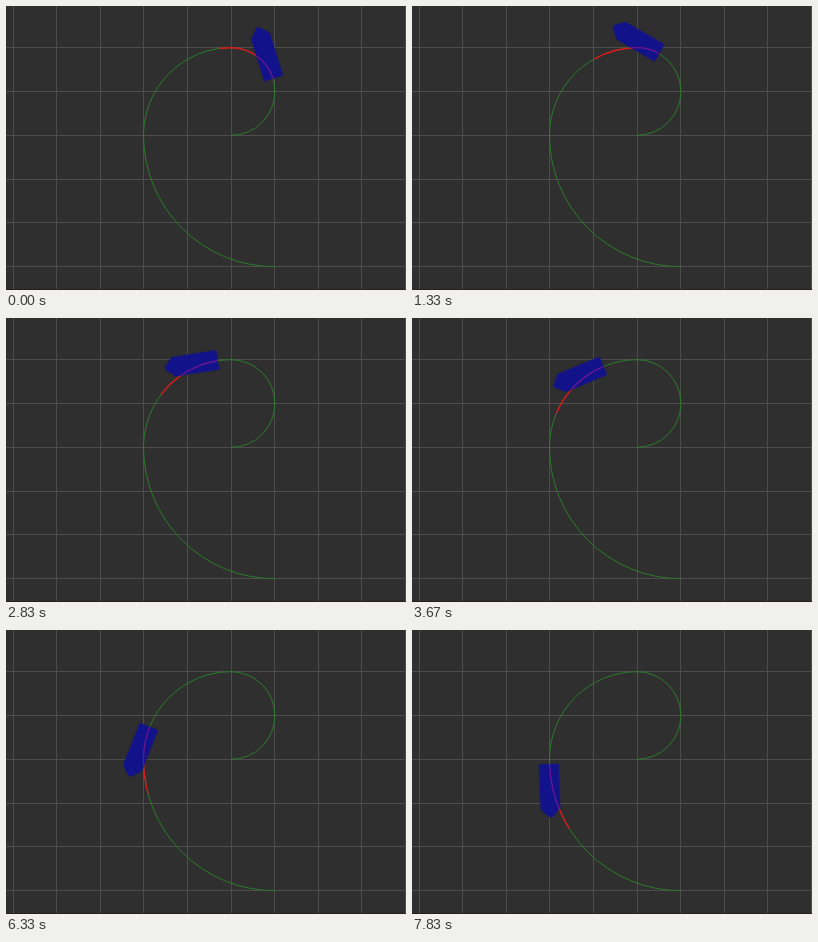
An HTML page with a canvas that plays this animation: 400 px wide and 284 px high, repeating every 8 s.

```html
<!DOCTYPE html>
<html lang="en">
<head>
<meta charset="utf-8">
<title>Path following</title>
<style>
  html, body { margin: 0; width: 100%; height: 100%; overflow: hidden; background: #2f2f2f; }
  canvas { display: block; }
</style>
</head>
<body>
<canvas id="stage" width="400" height="284"></canvas>
<script>
const ctx = document.getElementById('stage').getContext('2d');
const W = 400, H = 284, LOOP = 8000, STEPS_PER_MS = 0.006;
const CELL = 43.8, CX = 225.1, CY = 129.3;
const LOOKAHEAD = 67.5;

// Three arcs, each joined tangentially to the next.
const arcs = [
  { x: CX, y: CY - CELL, r: CELL, from: Math.PI / 2, sweep: Math.PI },
  { x: CX, y: CY, r: 2 * CELL, from: -Math.PI / 2, sweep: Math.PI / 2 },
  { x: CX + CELL, y: CY, r: 3 * CELL, from: Math.PI, sweep: Math.PI / 2 }
];
const track = new Path2D();
for (const a of arcs) track.arc(a.x, a.y, a.r, a.from, a.from - a.sweep, true);

const vehicle = new Path2D('M0 -9H44L53 -1V2L45 10.5H0Z');

// Time in ms and distance travelled along the track.
const travel = [[0, 82], [1333, 114.5], [2167, 134], [3667, 172.2],
                [5000, 207.8], [6333, 242], [7833, 280], [8000, 284]];

function distanceAt(t) {
  const i = Math.max(1, travel.findIndex(([time]) => time >= t));
  const [t0, s0] = travel[i - 1], [t1, s1] = travel[i];
  return s0 + (s1 - s0) * (t - t0) / (t1 - t0);
}

function poseAt(s) {
  let i = 0;
  while (i < arcs.length - 1 && s > arcs[i].r * arcs[i].sweep) {
    s -= arcs[i].r * arcs[i].sweep;
    i++;
  }
  const { x, y, r, from } = arcs[i];
  const angle = from - s / r;
  return { x: x + r * Math.cos(angle), y: y + r * Math.sin(angle), heading: angle - Math.PI / 2 };
}

function drawGrid() {
  ctx.fillStyle = '#2f2f2f';
  ctx.fillRect(0, 0, W, H);
  ctx.fillStyle = '#4d4d4d';
  for (let i = -5; i <= 4; i++) ctx.fillRect(Math.floor(CX + i * 43.6), 0, 1, H);
  for (let i = -2; i <= 3; i++) ctx.fillRect(0, Math.floor(CY + i * 43.8), W, 1);
  ctx.fillStyle = '#281e20';
  ctx.fillRect(0, H - 1, W, 1);
}

function strokeTrack(color, width) {
  ctx.strokeStyle = color;
  ctx.lineWidth = width;
  ctx.stroke(track);
}

function draw(t) {
  const s = distanceAt(t);
  const { x, y, heading } = poseAt(s);
  const body = new Path2D();
  body.addPath(vehicle, new DOMMatrix().translate(x, y).rotate(heading * 180 / Math.PI));

  drawGrid();
  strokeTrack('#2d7f2a', 0.95);

  ctx.save();
  ctx.setLineDash([LOOKAHEAD, 1000]);
  ctx.lineDashOffset = -s;
  strokeTrack('#d8181c', 1.4);
  ctx.fillStyle = 'rgba(18, 18, 142, 0.92)';
  ctx.shadowColor = 'rgba(18, 18, 142, 0.6)';
  ctx.shadowBlur = 2;
  ctx.fill(body);
  ctx.shadowBlur = 0;
  ctx.clip(body);
  strokeTrack('#6a1690', 1.3);
  ctx.restore();
}

function frame() {
  const t = performance.now() % LOOP;
  // The picture advances six times a second.
  draw(Math.min(47, Math.floor((t + 3.4) * STEPS_PER_MS)) / STEPS_PER_MS);
  requestAnimationFrame(frame);
}
frame();
</script>
</body>
</html>
```
